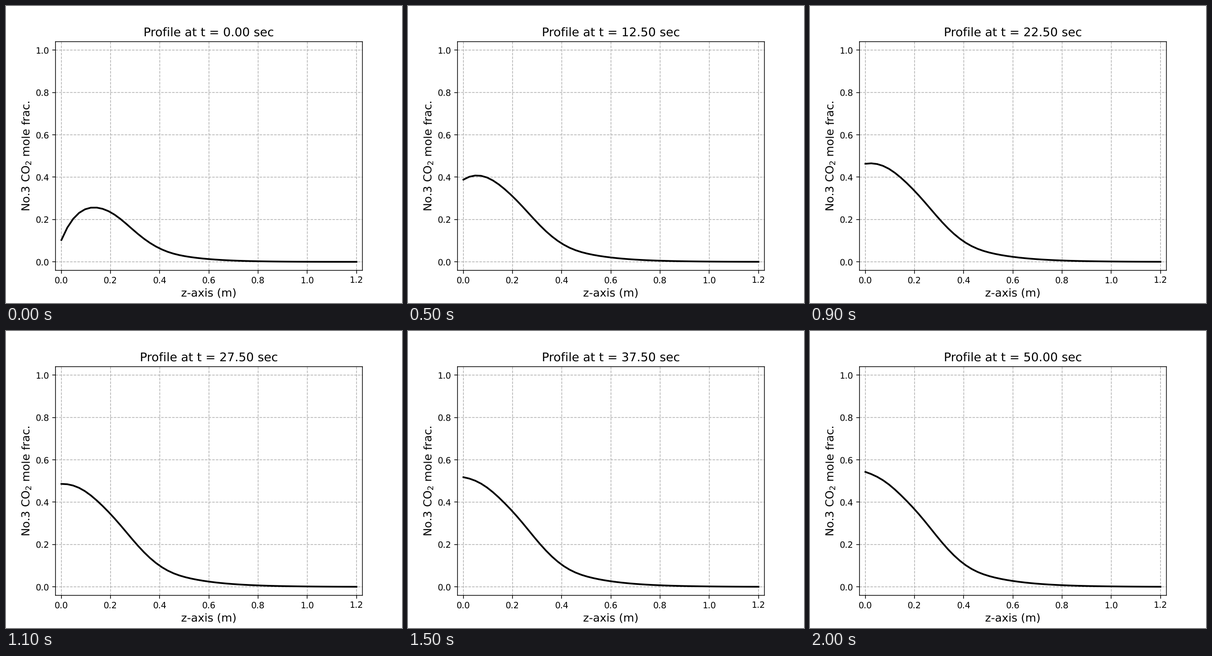
Write a matplotlib script that moves like this. It is 864 by 648 pixels and loops after 2.1 s.

```python
import numpy as np
import matplotlib.pyplot as plt
from matplotlib.animation import FuncAnimation

# unsnapped lines and unhinted glyphs keep sub-pixel positions
plt.rcParams.update({
    "font.family": "DejaVu Sans",
    "path.snap": False,
    "text.hinting": "none",
})

STEPS = 21
DT = 2.5
T_END = DT * (STEPS - 1)


def softplus(x, width):
    return width * np.log1p(np.exp(x / width))


def final_profile(z):
    """Logistic front with a rounded shoulder and a slower tail."""
    shoulder = 0.08 * np.exp(-((z - 0.14) / 0.08) ** 2)
    tail = 3.8 * softplus(z - 0.455, 0.03)
    return 0.582 / (1 + np.exp(-2.634 + 10.3 * z + shoulder - tail))


def initial_ratio(z):
    """Share of the final profile present at the start."""
    return 0.8 - 0.55 * z - 0.61 * np.exp(-9.7 * z - 350 * z ** 4)


def time_constant(z):
    return 11 + 12 / (1 + np.exp((0.2 - z) / 0.035))


z = np.linspace(0, 1.2, 51)
last = final_profile(z)
first = last * initial_ratio(z)
tau = time_constant(z)


def profile(t):
    """Mole fraction along the axis, saturating hyperbolically in time."""
    gain = t / (t + tau) * (T_END + tau) / T_END
    return first + (last - first) * gain


fig, ax = plt.subplots(figsize=(6.4, 4.8), dpi=135)
fig.subplots_adjust(left=0.125, right=0.9, bottom=0.11, top=0.88)
line, = ax.plot(z, profile(0), color="black", lw=2)
ax.set_xlim(-0.024, 1.224)
ax.set_ylim(-0.04, 1.04)
ax.set_xlabel("z-axis (m)", fontsize=13)
ax.set_ylabel("No.3 CO$_2$ mole frac.", fontsize=13, labelpad=3)
ax.grid(linestyle="--")
title = ax.set_title("", fontsize=14)


def update(i):
    t = i * DT
    line.set_ydata(profile(t))
    title.set_text(f"Profile at t = {t:.2f} sec")
    return line, title


anim = FuncAnimation(fig, update, frames=STEPS, interval=100,
                     repeat=True, repeat_delay=0)
plt.show()
```
